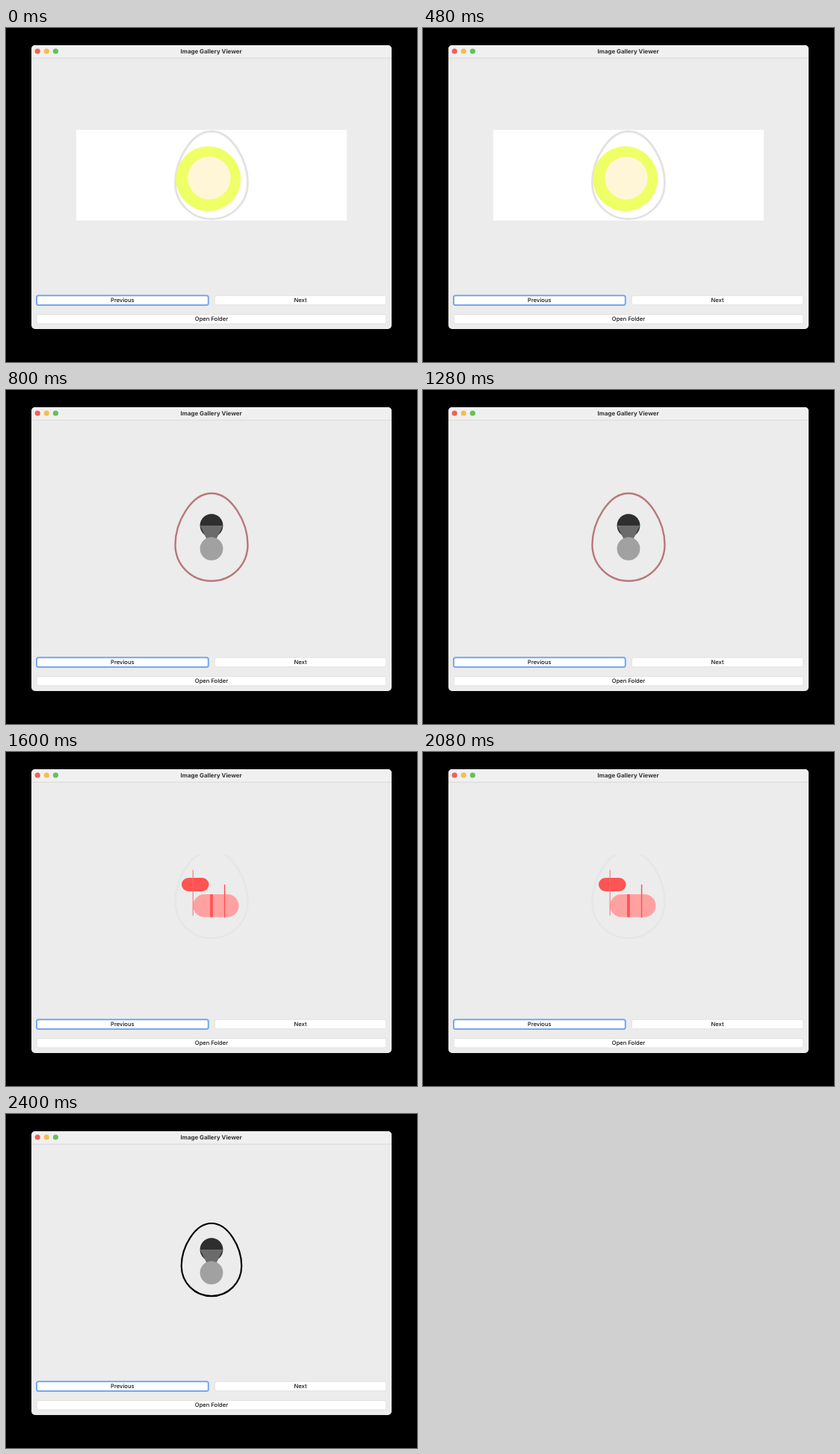
Recreate the animation shown at these times as an HTML page. Size 550 px wide and 446 px high, loop 3200 ms.

```html
<!DOCTYPE html>
<html lang="en">
<head>
<meta charset="utf-8">
<title>Image Gallery Viewer</title>
<style>
  html, body { margin: 0; width: 100%; height: 100%; overflow: hidden; background: #000; }
  svg { display: block; width: 100vw; height: 100vh; }
  text {
    font: 500 7.6px Inter, "Liberation Sans", sans-serif;
    text-anchor: middle;
    text-rendering: geometricPrecision;
    fill: #111;
  }
  .title { font-size: 7.9px; font-weight: 700; fill: #333; }
  .button { fill: #fff; stroke: #d4d4d4; stroke-width: .6; }
  .focus { stroke: #77a8ee; stroke-width: 2; }
  .egg { fill: none; }
  .slide { opacity: 0; animation: show 3.2s step-end infinite; }
  .s1 { animation-delay: -3.2s; }
  .s2 { animation-delay: -2.4s; }
  .s3 { animation-delay: -1.6s; }
  .s4 { animation-delay: -.8s; }
  @keyframes show {
    0% { opacity: 1; }
    25%, 100% { opacity: 0; }
  }
</style>
</head>
<body>
<svg viewBox="0 0 550 446">
  <defs>
    <path id="egg" d="M275 138C302.5 138 323.5 177.5 323.5 206.5C323.5 233.5 302 255 275 255S226.5 233.5 226.5 206.5C226.5 177.5 247.5 138 275 138Z"/>
    <g id="figure">
      <circle cx="275" cy="181" r="15.4" fill="#2e2e2e"/>
      <path d="M259.6 181H290.4L275 212Z" fill="#6b6b6b"/>
      <circle cx="275" cy="212" r="15.4" fill="#a1a1a1"/>
    </g>
    <clipPath id="crop"><path d="M215 136.5H335V257H215Z"/></clipPath>
  </defs>

  <!-- window -->
  <rect x="34" y="23" width="482" height="379" rx="5" fill="#ececec"/>
  <path d="M34 40V28a5 5 0 0 1 5-5H511a5 5 0 0 1 5 5V40Z" fill="#f1f0f1"/>
  <path d="M34 40.2H516" stroke="#d5d5d5" stroke-width=".8"/>
  <circle cx="42.2" cy="31" r="3.6" fill="#ee6259"/>
  <circle cx="54.3" cy="31" r="3.6" fill="#f5bd4f"/>
  <circle cx="66.4" cy="31" r="3.6" fill="#61c454"/>
  <text class="title" x="274.6" y="33.7">Image Gallery Viewer</text>

  <!-- buttons -->
  <rect class="button focus" x="41" y="357.2" width="229.8" height="12.8" rx="2.5"/>
  <rect class="button" x="279.3" y="357.3" width="229.5" height="12.4" rx="2.5"/>
  <rect class="button" x="41.2" y="382.5" width="467.6" height="12.4" rx="2.5"/>
  <text x="155.8" y="366.2">Previous</text>
  <text x="394" y="366.2">Next</text>
  <text x="275" y="391.4">Open Folder</text>

  <!-- pictures -->
  <g class="slide s1">
    <path d="M94 136H456V257H94Z" fill="#fff"/>
    <use class="egg" href="#egg" stroke="#e2e2e5" stroke-width="2.8"/>
    <circle cx="270.7" cy="201.4" r="43.4" fill="#efff66"/>
    <circle cx="272" cy="200.3" r="28.6" fill="#fff6d8"/>
  </g>
  <g class="slide s2">
    <use class="egg" href="#egg" stroke="#b9777a" stroke-width="2.4"/>
    <use href="#figure"/>
  </g>
  <g class="slide s3">
    <g clip-path="url(#crop)">
      <use class="egg" href="#egg" y="-6.5" stroke="#e5e6e6" stroke-width="2.8"/>
    </g>
    <rect x="250.3" y="190" width="61.2" height="30.5" rx="15.25" fill="#ffa1a1"/>
    <rect x="235" y="168" width="36.6" height="18" rx="9" fill="#ff5454"/>
    <path d="M250.2 157.5V218.5" stroke="#ff6c6c"/>
    <path d="M275 190V220.5" stroke="#ff5454" stroke-width="3.8"/>
    <path d="M292.6 177V221.3" stroke="#ff5454" stroke-width="1.5"/>
  </g>
  <g class="slide s4">
    <use class="egg" href="#egg" stroke="#000" stroke-width="2.6" transform="translate(275 146) scale(.83) translate(-275 -138)"/>
    <use href="#figure"/>
  </g>
</svg>
</body>
</html>
```
